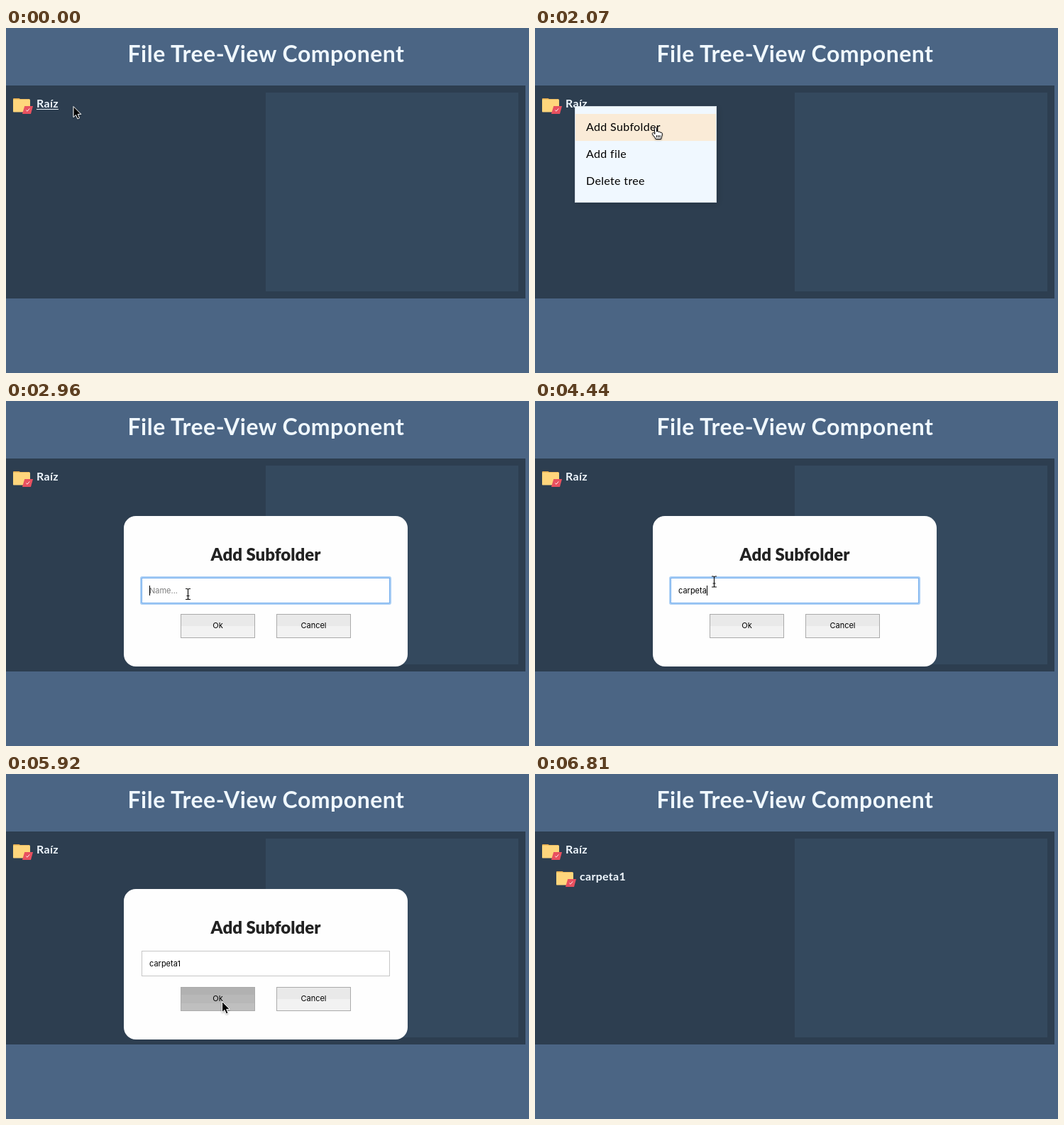
Animation of 737x486 px, one loop 8.17 s. Source, as an HTML page:

```html
<!DOCTYPE html>
<html lang="en">
<head>
<meta charset="utf-8">
<title>File Tree-View Component</title>
<style>
  html, body { margin: 0; width: 100%; height: 100%; overflow: hidden; background: #4b6584; }
  svg { display: block; width: 737px; height: 486px; }
  text { font-family: Lato, "Open Sans", sans-serif; white-space: pre; }
  .title { font-size: 32px; font-weight: 700; letter-spacing: .5px; fill: #f0f8ff; }
  .node { font-size: 16px; font-weight: 700; letter-spacing: .3px; fill: #f0f8ff; }
  .item { font-size: 16px; letter-spacing: .35px; fill: #000; }
  .heading { font-size: 24px; font-weight: 900; fill: #222; }
  .form { font-family: Inter, Roboto, sans-serif; font-size: 11px; fill: #000; }
  .mid { text-anchor: middle; }
</style>
</head>
<body>
<svg viewBox="0 0 737 486" xmlns="http://www.w3.org/2000/svg">
  <defs>
    <filter id="shade" x="-20%" y="-20%" width="140%" height="140%">
      <feDropShadow dx="2" dy="2" stdDeviation="5" flood-color="#000" flood-opacity=".15"/>
    </filter>
    <filter id="soft" x="-50%" y="-50%" width="200%" height="200%">
      <feDropShadow dx="0" dy="1" stdDeviation=".8" flood-color="#000" flood-opacity=".35"/>
    </filter>
    <g id="folder">
      <path d="M0 1Q0 0 1 0H8.5L10 1H23V8H0Z" fill="#e3a94b"/>
      <rect y="1.5" width="24" height="18" rx=".8" fill="#ffd67c"/>
      <path d="M16.2 11H28L25 22H13Z" fill="#e8505f"/>
      <path d="M18.3 16.7L20 18.2L23.2 14.4" fill="none" stroke="#fff" stroke-width=".9"/>
    </g>
  </defs>

  <rect width="737" height="486" fill="#4b6584"/>
  <text class="title mid" x="366.5" y="47.5">File Tree-View Component</text>
  <rect y="81" width="732" height="300" fill="#2d3e50"/>
  <rect x="366" y="91" width="356" height="280" fill="#34495e"/>

  <use href="#folder" x="10" y="99"/>
  <text class="node" x="43" y="112">Raíz</text>
  <rect id="underline" x="43" y="114" width="31" height="1" fill="#f0f8ff"/>
  <g id="child">
    <use href="#folder" x="30" y="137"/>
    <text class="node" x="63" y="150">carpeta1</text>
  </g>

  <g id="menu">
    <rect x="56" y="110" width="200" height="136" fill="#f0f8ff" filter="url(#shade)"/>
    <rect x="56.5" y="110.5" width="199" height="135" fill="none" stroke="#d5dee6"/>
    <rect id="hover" x="57" y="121" width="198" height="38" fill="#faebd7"/>
    <text class="item" x="72" y="145">Add Subfolder</text>
    <text class="item" x="72" y="183">Add file</text>
    <text class="item" x="72" y="221">Delete tree</text>
  </g>

  <g id="modal">
    <rect x="166" y="162" width="400" height="212" rx="17" fill="#fefefe"/>
    <text class="heading mid" x="366" y="225">Add Subfolder</text>
    <rect x="191.5" y="249.5" width="349" height="35" fill="#fff" stroke="#c6c6c6"/>
    <g id="focus" fill="none">
      <rect x="190.5" y="248.5" width="351" height="37" rx="1.5" stroke="#a9cef5" stroke-width="3"/>
      <rect x="191.5" y="249.5" width="349" height="35" stroke="#74aeee"/>
    </g>
    <text class="form" id="hint" x="202" y="271" style="fill:#7d7d7d">Name...</text>
    <text class="form" id="field" x="202" y="271"></text>
    <rect id="caret" y="260" width="1" height="14"/>
    <g id="buttons"></g>
  </g>

  <g id="cursor">
    <path id="arrow" d="M0 0V15.2L3.5 11.9L5.9 17.4L8.5 16.3L6.2 10.9H10.8Z" stroke="#fff" filter="url(#soft)"/>
    <path id="hand" d="M-1.3 1.2C-1.3-.7 1.5-.7 1.6 1.2L2.1 6.2C2.5 5 4.6 5.2 4.7 6.7C5.3 5.7 7.2 6.1 7.3 7.6C8 6.8 9.8 7.2 9.8 8.9C10 12.2 8.3 13.3 8.2 16.5H.6C.3 14.1-2.4 12.5-3.9 9.7C-4.9 8-3.2 6.9-1.9 8L-.5 9.4Z M2 11V14.5M4.3 11V14.5M6.5 11V14.5"
      fill="#fff" stroke="#000" stroke-linejoin="round" filter="url(#soft)"/>
    <path id="beam" d="M-3.5-7.5H-1.5Q0-7.5 0-6Q0-7.5 1.5-7.5H3.5M0-6V6M-3.5 7.5H-1.5Q0 7.5 0 6Q0 7.5 1.5 7.5H3.5M-2 2.5H2"
      fill="none" stroke="#111" stroke-width="1.2"/>
  </g>
</svg>
<script>
const LOOP = 8170;
const $ = id => document.getElementById(id);
const show = (id, on) => $(id).setAttribute('display', on ? 'inline' : 'none');

function button(x, label, id, bands) {
  const h = 34 / bands.length;
  const fills = bands.map((c, i) =>
    `<rect x="${x}" y="${300 + i * h}" width="105" height="${h}" fill="${c}" shape-rendering="crispEdges"/>`).join('');
  return `<g id="${id}">${fills}
    <rect x="${x + .5}" y="300.5" width="104" height="33" fill="none" stroke="#aaa"/>
    <text class="form mid" x="${x + 52.5}" y="320">${label}</text></g>`;
}
const light = ['#e9e9e9', '#f2f2f2'];
$('buttons').innerHTML = button(246, 'Ok', 'ok', light) +
  button(246, 'Ok', 'pressed', ['#b1b1b1', '#b8b8b8', '#bfbfbf']) +
  button(381, 'Cancel', 'cancel', light);

// Number of ticks reached out of n, spread evenly from first to last
function ticks(t, first, last, n) {
  if (t < first) return 0;
  if (n === 1) return 1;
  const gap = (last - first) / (n - 1);
  return Math.min(n, Math.floor((t - first) / gap + 1e-6) + 1);
}

const smooth = p => p * p * (3 - 2 * p);
const start = [95, 110.5];
const moves = [
  { first: 150, last: 600, n: 4, to: [54.5, 109] },
  { first: 1040, last: 2070, n: 8, to: [169.5, 140] },
  { first: 2510, last: 2960, n: 4, to: [256.5, 272] },
  { first: 3260, last: 3260, n: 1, to: [252.5, 254.5] },
  { first: 5030, last: 5770, n: 6, to: [304.5, 320.5] },
  { first: 6370, last: 6660, n: 3, to: [560, 441] }
];

function pointer(t) {
  let pos = start;
  for (const m of moves) {
    const p = smooth(ticks(t, m.first, m.last, m.n) / m.n);
    pos = pos.map((v, i) => v + (m.to[i] - v) * p);
  }
  return pos;
}

function draw(t) {
  const [x, y] = pointer(t);
  const menu = t >= 750 && t < 2220;
  const modal = t >= 2220 && t < 6070;
  const hover = menu && x > 56 && y >= 121;
  const hand = hover || (t >= 2220 && t < 2510);
  const beam = modal && x > 191 && x < 541 && y > 249 && y < 285;
  const focus = t >= 2960 && t < 5920;
  const down = t >= 5920;

  show('underline', t < 750);
  show('child', t >= 6070);
  show('menu', menu);
  show('hover', hover);
  show('modal', modal);
  show('focus', focus);
  show('ok', !down);
  show('pressed', down);

  const typed = 'carpeta'.slice(0, ticks(t, 3560, 4440, 7)) + (t >= 4740 ? '1' : '');
  $('field').textContent = typed;
  show('hint', !typed);
  show('caret', focus && !(t >= 4590 && t < 4740));
  const end = modal && typed ? $('field').getComputedTextLength() : 0;
  $('caret').setAttribute('x', Math.round(202 + end));

  show('cursor', t < 6810);
  $('cursor').setAttribute('transform', `translate(${x} ${y})`);
  show('hand', hand);
  show('beam', beam);
  show('arrow', !hand && !beam);
}

const begin = performance.now();
function frame() {
  draw((performance.now() - begin) % LOOP);
  requestAnimationFrame(frame);
}
frame();
</script>
</body>
</html>
```
